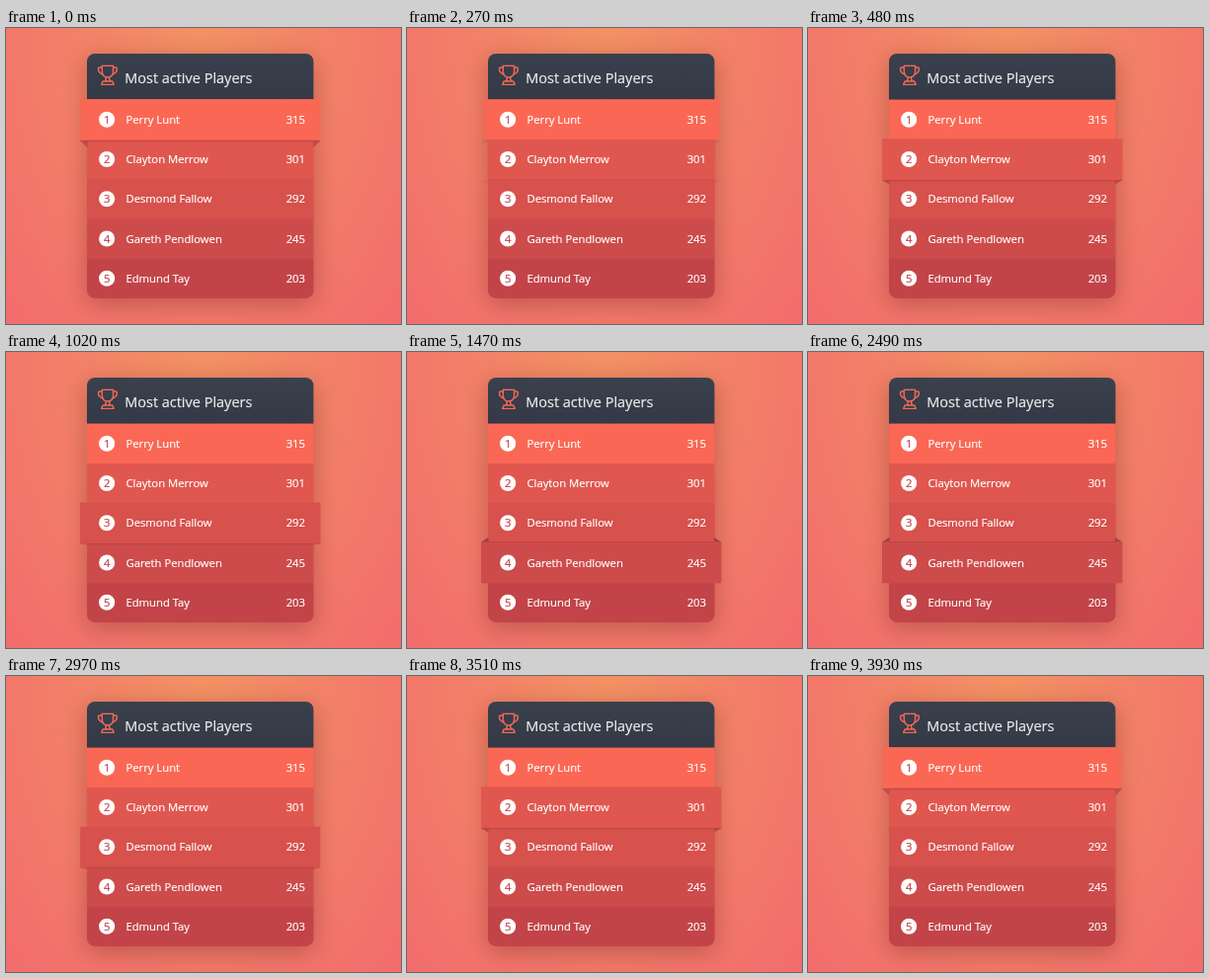
These frames come from a looping animation (400x300 px, 3.96 s). An HTML page:

```html
<!DOCTYPE html>
<html lang="en">
<head>
<meta charset="utf-8">
<title>Most active Players</title>
<style>
@property --lift { syntax: "<number>"; inherits: true; initial-value: 0; }
@property --fold { syntax: "<number>"; inherits: true; initial-value: 0; }

* { box-sizing: border-box; margin: 0; padding: 0; }
html, body { width: 100%; height: 100%; overflow: hidden; }
body {
  position: relative;
  font-family: "Open Sans", sans-serif;
  color: #fff;
  background: radial-gradient(376px 564px at center top, #f39264, #f2606f);
}

.board {
  position: absolute;
  left: 82.4px;
  top: 26.1px;
  width: 285px;
  height: 308px;
  border-radius: 10px;
  box-shadow: 0 7px 30px rgba(62, 9, 11, .3);
  transform: scale(.805);
  transform-origin: 0 0;
}
header {
  height: 59px;
  border-radius: 10px 10px 0 0;
  background: linear-gradient(#3a404d, #181c26) 0 0 / 100% 308px no-repeat;
}
header svg {
  position: absolute;
  left: 12.5px;
  top: 14px;
  width: 26px;
  height: 26px;
  fill: none;
  stroke: #f26856;
  stroke-width: 1.8;
  stroke-linejoin: round;
}
h1 {
  position: absolute;
  left: 47.4px;
  top: 18px;
  font-size: 18px;
  font-weight: 400;
  line-height: 24.5px;
  white-space: nowrap;
  color: #ebebeb;
  -webkit-text-stroke: .25px;
}

ol {
  position: absolute;
  top: 58px;
  width: 100%;
  list-style: none;
  counter-reset: rank;
  border-radius: 0 0 10px 10px;
  background: #d7514d;
}
li {
  position: relative;
  z-index: 1;
  height: 50px;
  font-size: 14px;
  line-height: 50px;
  white-space: nowrap;
  counter-increment: rank;
  background: var(--row);
  -webkit-text-stroke: .25px;
  animation: 3.96s -.27s infinite;
  animation-timing-function: ease-in-out, step-end;
}
li::before {
  content: counter(rank);
  position: absolute;
  z-index: 2;
  left: 15px;
  top: 15px;
  width: 20px;
  height: 20px;
  line-height: 20px;
  text-align: center;
  color: #c24448;
  background: #fff;
  border-radius: 50%;
}
li::after {
  content: "";
  position: absolute;
  z-index: 1;
  inset: 0;
  border-radius: inherit;
  background: var(--row);
  box-shadow: 0 var(--edge);
  opacity: var(--lift);
  transform: scale(calc(1 + .06 * var(--lift)), calc(1 + .03 * var(--lift)));
}
li span, li b { position: absolute; z-index: 2; font-weight: 400; }
li span { left: 49px; }
li b { right: 10.5px; }

/* folded ribbon corners */
i::before, i::after {
  content: "";
  position: absolute;
  z-index: 2;
  top: 51px;
  width: 10px;
  height: var(--h);
  background: var(--dark);
  opacity: var(--fold);
}
i::before { left: -9px; clip-path: polygon(0 0, 100% 0, 100% 100%); }
i::after { right: -9px; clip-path: polygon(0 0, 100% 0, 0 100%); }
.up i::before, .up i::after { top: calc(-1px - var(--h)); }
.up i::before { clip-path: polygon(100% 0, 100% 100%, 0 100%); }
.up i::after { clip-path: polygon(0 0, 100% 100%, 0 100%); }

li:nth-child(1) { --row: #fa6855; --dark: #c24448; --h: 10px; --edge: 3px 0 rgba(0, 0, 0, .08); animation-name: hover1, top1; }
li:nth-child(2) { --row: #e0574f; --dark: #ba4741; --h: 6px; --edge: 2px 0 rgba(0, 0, 0, .08); animation-name: hover2, top2; }
li:nth-child(3) { --row: #d7514d; --dark: #b0433f; --h: 2px; --edge: 1px 0 rgba(0, 0, 0, .11); animation-name: hover3, top3; }
li:nth-child(4) { --row: #cd4b4b; --dark: #a63d3d; --h: 6px; --edge: -1px 0 rgba(0, 0, 0, .15); animation-name: hover4, top4; }
li:nth-child(5) { --row: #c24448; --dark: #993639; --h: 8px; --edge: -2.5px 0 rgba(0, 0, 0, .12); animation-name: hover5, top5; border-radius: 0 0 10px 10px; }

/* lift takes .3s both ways; folds take .35s in and .1s out */
@keyframes hover1 {
  0% { --lift: 0; --fold: 0; }
  7.576% { --lift: 1; }
  8.838% { --fold: 1; }
  11.364% { --lift: 1; --fold: 1; }
  13.889% { --fold: 0; }
  18.939%, 100% { --lift: 0; --fold: 0; }
}
@keyframes hover2 {
  0% { --lift: 1; --fold: 1; }
  2.525% { --fold: 0; }
  7.576%, 11.364% { --lift: 0; --fold: 0; }
  18.939% { --lift: 1; }
  20.202% { --fold: 1; }
  23.737% { --lift: 1; --fold: 1; }
  26.263% { --fold: 0; }
  31.313%, 87.121% { --lift: 0; --fold: 0; }
  94.697% { --lift: 1; }
  95.96% { --fold: 1; }
  100% { --lift: 1; --fold: 1; }
}
@keyframes hover3 {
  0%, 23.737% { --lift: 0; --fold: 0; }
  31.313% { --lift: 1; }
  32.576% { --fold: 1; }
  35.606% { --lift: 1; --fold: 1; }
  38.131% { --fold: 0; }
  43.182%, 75% { --lift: 0; --fold: 0; }
  82.576% { --lift: 1; }
  83.838% { --fold: 1; }
  87.121% { --lift: 1; --fold: 1; }
  89.646% { --fold: 0; }
  94.697%, 100% { --lift: 0; --fold: 0; }
}
@keyframes hover4 {
  0%, 35.606% { --lift: 0; --fold: 0; }
  43.182% { --lift: 1; }
  44.444% { --fold: 1; }
  49.242% { --lift: 1; --fold: 1; }
  51.768% { --fold: 0; }
  56.818%, 62.121% { --lift: 0; --fold: 0; }
  69.697% { --lift: 1; }
  70.96% { --fold: 1; }
  75% { --lift: 1; --fold: 1; }
  77.525% { --fold: 0; }
  82.576%, 100% { --lift: 0; --fold: 0; }
}
@keyframes hover5 {
  0%, 49.242% { --lift: 0; --fold: 0; }
  56.818% { --lift: 1; }
  58.081% { --fold: 1; }
  62.121% { --lift: 1; --fold: 1; }
  64.646% { --fold: 0; }
  69.697%, 100% { --lift: 0; --fold: 0; }
}

@keyframes top1 { 0% { z-index: 2; } 11.364%, 100% { z-index: 1; } }
@keyframes top2 { 0%, 23.737% { z-index: 1; } 11.364%, 87.121%, 100% { z-index: 2; } }
@keyframes top3 { 0%, 35.606%, 87.121%, 100% { z-index: 1; } 23.737%, 75% { z-index: 2; } }
@keyframes top4 { 0%, 49.242%, 75%, 100% { z-index: 1; } 35.606%, 62.121% { z-index: 2; } }
@keyframes top5 { 0%, 62.121%, 100% { z-index: 1; } 49.242% { z-index: 2; } }
</style>
</head>
<body>
<main class="board">
  <header>
    <svg viewBox="0 0 26 26">
      <path d="M6 1.2H20V8.5C20 13 17 15.8 13 15.8S6 13 6 8.5Z"/>
      <path d="M6 3.5H3C1.6 3.5 1.2 4 1.2 5C1.2 9 3 11 7 11.8M20 3.5H23C24.4 3.5 24.8 4 24.8 5C24.8 9 23 11 19 11.8"/>
      <path d="M11 15.8C11 18.5 10.5 19.8 9.5 20.8M15 15.8C15 18.5 15.5 19.8 16.5 20.8M7 20.8H19L20.8 25H5.2Z"/>
    </svg>
    <h1>Most active Players</h1>
  </header>
  <ol>
    <li><i></i><span>Perry Lunt</span><b>315</b></li>
    <li><i></i><span>Clayton Merrow</span><b>301</b></li>
    <li><i></i><span>Desmond Fallow</span><b>292</b></li>
    <li class="up"><i></i><span>Gareth Pendlowen</span><b>245</b></li>
    <li class="up"><i></i><span>Edmund Tay</span><b>203</b></li>
  </ol>
</main>
</body>
</html>
```
